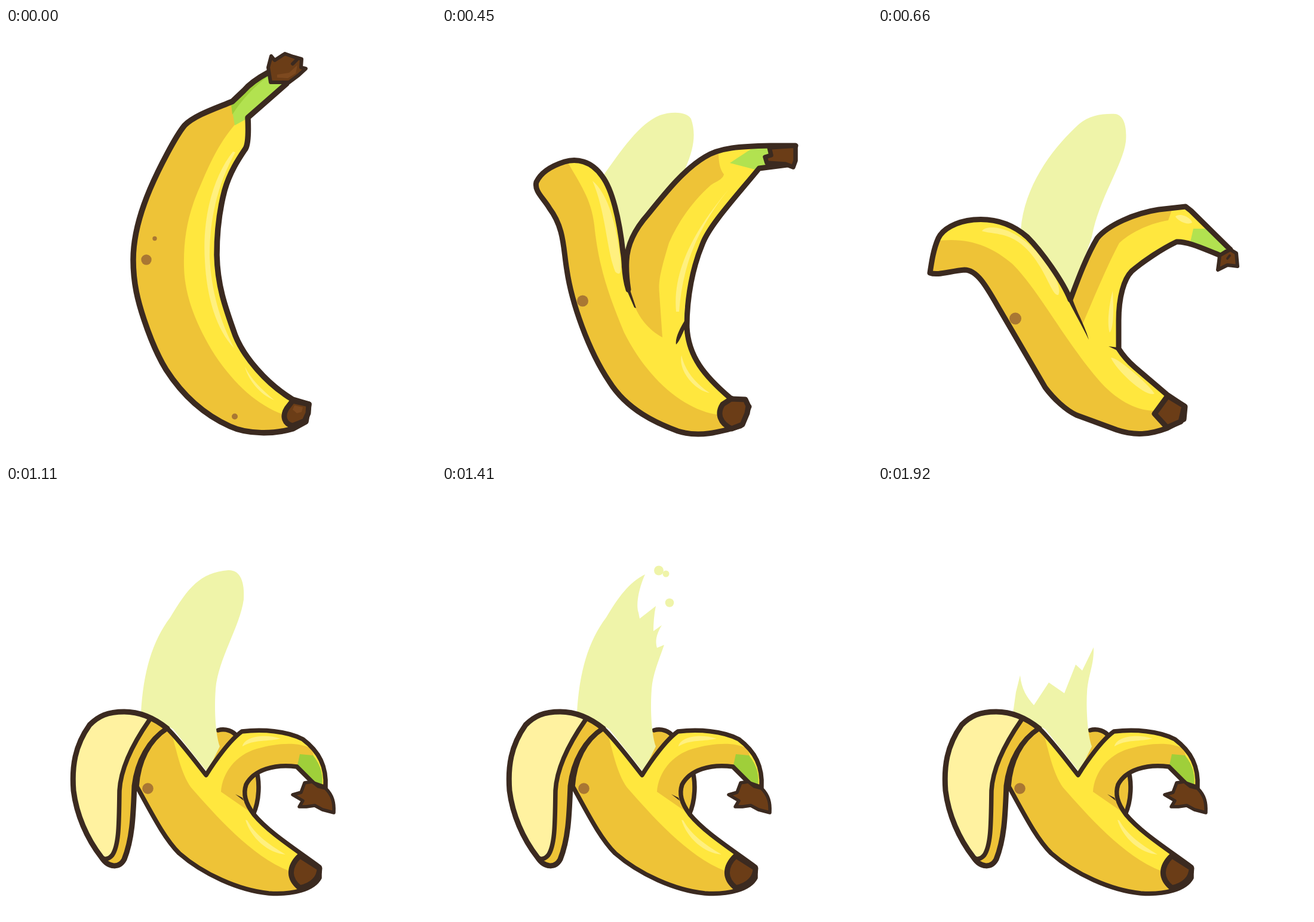
An HTML page without scripts for the animation above (2130 ms loop, 720 px wide and 720 px high).

```html
<!DOCTYPE html>
<html lang="en">
<head>
<meta charset="utf-8">
<title>Peeling banana</title>
<style>
html, body { margin: 0; width: 100%; height: 100%; overflow: hidden; background: #fff; }
svg { display: block; width: 100%; height: 100%; }
.ink { fill: none; stroke: #3b2a20; stroke-width: 9; stroke-linejoin: round; stroke-linecap: round; }
.thin { stroke-width: 7.5; }
.fine { stroke-width: 6; }
.crack { fill: #3b2a20; }
.sun { fill: #ffe73e; }
.amber { fill: #eec337; }
.lime { fill: #b2e250; }
.leaf { fill: #9fcf3a; }
.bark { fill: #6b3d17; }
.wood { fill: #7d491f; }
.spot { fill: #a97733; }
.glow { fill: #fff07f; }
.flesh { fill: #eff4a9; }
.cream { fill: #fff2a0; }

/* one loop: 240, 450, 660, 870, 1110, then bites at 1410, 1590, 1770, 1920 ms */
.on { opacity: 0; animation: 2130ms step-end infinite; }
.p0 { animation-name: p0; } .p1 { animation-name: p1; } .p2 { animation-name: p2; }
.p3 { animation-name: p3; } .p4 { animation-name: p4; } .p5 { animation-name: p5; }
.whole { animation-name: whole; } .bite1 { animation-name: bite1; }
.bite2 { animation-name: bite2; } .bite3 { animation-name: bite3; }
.crumb1 { animation-name: crumb1; } .crumb2 { animation-name: crumb2; } .crumb3 { animation-name: crumb3; }
@keyframes p0 { 0% { opacity: 1 } 11.268%, to { opacity: 0 } }
@keyframes p1 { 0% { opacity: 0 } 11.268% { opacity: 1 } 21.127%, to { opacity: 0 } }
@keyframes p2 { 0% { opacity: 0 } 21.127% { opacity: 1 } 30.986%, to { opacity: 0 } }
@keyframes p3 { 0% { opacity: 0 } 30.986% { opacity: 1 } 40.845%, to { opacity: 0 } }
@keyframes p4 { 0% { opacity: 0 } 40.845% { opacity: 1 } 52.113%, to { opacity: 0 } }
@keyframes p5 { 0% { opacity: 0 } 52.113%, to { opacity: 1 } }
@keyframes whole { 0% { opacity: 1 } 66.197%, to { opacity: 0 } }
@keyframes bite1 { 0% { opacity: 0 } 66.197% { opacity: 1 } 74.648%, to { opacity: 0 } }
@keyframes bite2 { 0% { opacity: 0 } 74.648% { opacity: 1 } 83.099%, to { opacity: 0 } }
@keyframes bite3 { 0% { opacity: 0 } 83.099%, to { opacity: 1 } }
@keyframes crumb1 {
  0% { opacity: 0 }
  66.197% { opacity: 1; transform: none }
  69.014% { opacity: 1; transform: translate(20px, 4px) }
  71.831% { opacity: 1; transform: translate(38px, 16px) }
  74.648%, to { opacity: 0 }
}
@keyframes crumb2 {
  0% { opacity: 0 }
  74.648% { opacity: 1; transform: none }
  77.465% { opacity: 1; transform: translate(-24px, 4px) }
  80.282% { opacity: 1; transform: translate(-46px, 16px) }
  83.099%, to { opacity: 0 }
}
@keyframes crumb3 {
  0% { opacity: 0 }
  83.099% { opacity: 1; transform: none }
  86.62% { opacity: 1; transform: translate(14px, 8px) }
  90.141%, to { opacity: 0 }
}
</style>
</head>
<body>
<svg viewBox="0 0 720 720">
<defs>
  <path id="b0" d="M440 74C425 82 410 91 398 105L379 123C350 135 316 146 299 163C284 181 256 235 241 270C222 315 213 355 213 388C213 428 221 458 231 488C241 518 252 546 268 572C297 617 335 649 375 667C405 681 450 680 480 671L502 659L507 630L480 622C435 595 398 550 384 515C366 465 354 430 353 380C353 345 356 310 366 272C375 240 391 217 401 202Q407 192 405 150L470 93Z"/>
  <path id="b1" d="M290 322C286 280 298 225 312 195C322 172 333 158 343 147L345 143L331 133C300 140 280 165 268 190C245 235 220 280 211 315C203 350 204 380 204 410C207 460 224 510 254 557C290 612 360 662 420 680H452C475 679 490 674 503 664L510 632L467 605C435 572 408 540 398 500C385 460 380 430 381 390C383 340 395 300 415 265C430 240 445 230 456 215V190C475 177 495 170 518 167V130C485 133 455 146 428 153L406 153C385 178 365 200 340 225C310 255 298 290 290 322Z"/>
  <path id="b2" d="M312 438C303 410 307 395 303 375C297 320 285 270 268 248C250 222 225 218 205 224C180 232 165 243 158 258C154 273 170 285 180 302C205 335 203 370 209 405C217 460 245 540 280 592C310 640 360 662 395 675C430 686 465 677 500 666L514 634L482 619C440 583 412 550 410 500C410 450 420 400 436 362C448 330 490 285 531 235L578 229L592 197H550C500 198 465 200 440 216C405 237 375 275 345 312C320 340 310 365 309 390C308 410 310 425 312 438Z"/>
  <path id="b3" d="M322 455C310 425 275 375 250 350C225 328 195 318 160 321C130 324 108 337 101 352C93 370 90 390 87 410C100 415 120 407 145 405C165 405 180 430 200 465L280 602C295 622 315 640 332 648L400 673C430 683 455 681 484 670L512 655L514 634L484 614L430 568C415 555 408 545 403 537V490C403 450 412 420 425 407C445 390 475 370 500 358C520 357 550 372 574 381L590 371L524 306L515 299L470 304C430 310 385 330 367 352C350 380 335 420 322 455Z"/>
  <path id="b4" d="M340 483C355 460 380 425 402 401C430 397 460 400 487 413C515 430 527 455 525 484L507 476C495 462 475 457 455 458C425 460 403 485 396 510C400 530 412 548 425 562C445 588 480 610 518 638L515 658C490 685 440 686 400 677C350 665 298 637 275 608C245 573 235 545 228 520C215 490 205 475 189 467C205 430 240 412 278 408C292 418 315 450 340 483Z"/>
  <path id="b5" d="M335 484C350 460 375 425 395 411C430 407 470 410 497 424C525 445 537 470 535 505L515 498L487 470C450 465 415 475 402 500C397 515 400 530 415 550C440 580 480 605 525 638V656C515 675 480 685 440 682C390 677 330 650 290 615C265 590 245 550 219 503C222 460 240 425 270 406C290 425 320 465 335 484Z"/>
  <path id="l4" d="M278 408C250 390 215 375 175 377C160 377 140 385 125 400C95 430 90 470 95 505C100 530 115 552 132 547C145 540 165 505 176 480L189 467C205 430 240 412 278 408Z"/>
  <path id="l5" d="M270 406C250 390 225 378 198 378C170 378 155 385 140 400C115 435 110 470 113 510C118 550 135 590 160 622C172 640 190 640 198 625C212 590 213 550 215 502C220 460 240 425 270 406Z"/>
  <path id="core" d="M226 380C230 310 245 260 275 220C305 170 325 145 372 141C392 140 400 160 398 190C392 235 355 290 351 340C348 380 352 420 358 436L337 479L280 407Z"/>
  <path id="rim" d="M355 409C368 405 380 411 386 418M418 472C426 495 424 528 414 550"/>
  <path id="back" d="M350 410C375 402 390 417 400 430C425 465 432 515 414 550L337 480Z"/>
  <clipPath id="k0"><use href="#b0"/></clipPath>
  <clipPath id="k1"><use href="#b1"/></clipPath>
  <clipPath id="k2"><use href="#b2"/></clipPath>
  <clipPath id="k3"><use href="#b3"/></clipPath>
  <clipPath id="k4"><use href="#b4"/></clipPath>
  <clipPath id="k5"><use href="#b5"/></clipPath>
</defs>

<g class="on p0">
  <use href="#b0" class="amber"/>
  <g clip-path="url(#k0)">
    <path class="sun" d="M383 162C355 195 340 230 325 265C305 310 297 350 298 400C299 450 320 500 350 548C385 600 425 635 470 649L530 640L420 480V140Z"/>
    <path class="lime" d="M377 128L440 66L490 85L405 151L383 163Z"/>
    <path class="leaf" d="M377 128L440 66V80C415 98 395 120 379 145Z"/>
    <path class="glow" d="M380 207C350 245 328 310 333 390C336 450 352 505 382 536C358 490 344 440 341 385C340 320 355 260 384 208ZM400 567C405 588 425 614 449 623C428 605 410 588 400 567Z"/>
  </g>
  <circle class="spot" cx="235" cy="388" r="8.7"/>
  <circle class="spot" cx="249" cy="352.500" r="3.700"/>
  <circle class="spot" cx="383" cy="650.500" r="5"/>
  <use href="#b0" class="ink" style="stroke-width:9.500"/>
  <path class="bark" d="M480 624L507 630L506 645L500 658L480 666C466 663 462 650 470 637Z"/>
  <path class="wood" d="M483 632L497 635L495 643L487 645L480 639Z"/>
  <path class="ink" d="M480 624L507 630L506 645L500 658L480 666C466 663 462 650 470 637Z"/>
  <path class="bark" d="M443 91L439 66L444 47L450 54L467 43L481 48L495 52L494 66L502 68L490 79L474 91Z"/>
  <path class="wood" d="M454 78L474 75L488 62L485 76L472 84L454 83Z"/>
  <path class="ink fine" d="M443 91L439 66L444 47L450 54L467 43L481 48L495 52L494 66L502 68L490 79L474 91ZM480 60L487 53"/>
</g>

<g class="on p1">
  <path class="flesh" d="M292 310C286 250 312 180 348 143C365 140 383 139 391 160L340 230Z"/>
  <use href="#b1" class="amber"/>
  <g clip-path="url(#k1)">
    <path class="sun" d="M325 130C329 160 300 180 285 215C275 240 273 255 274 273H272C268 360 290 430 320 495C350 560 400 625 465 643L540 620L480 100Z"/>
    <path class="amber" d="M400 145L414 153C417 175 412 185 405 190C385 203 350 240 335 270C315 315 313 380 312 435C308 443 303 420 293 330L286 320Z"/>
    <path class="lime" d="M416 176L430 150L510 125V172L455 187Z"/>
    <path class="glow" d="M434 215C395 250 358 320 358 400C357 440 358 455 367 464C367 380 367 300 434 215ZM379 505C380 555 415 598 443 602C415 580 395 550 383 507Z"/>
  </g>
  <ellipse class="spot" cx="220.500" cy="429.500" rx="9.700" ry="8.700"/>
  <use href="#b1" class="ink thin"/>
  <path class="crack" d="M288 322C288 350 290 375 298 403C298 380 294 355 293 322Z"/>
  <path class="ink" style="fill:#6b3d17" d="M488 621L508 632L501 662L488 671C472 671 462 658 463 641Z"/>
  <path class="ink thin" style="fill:#6b3d17" d="M510 131L533 131L542 122L545 135L554 148L544 157L546 174L528 163L506 165L511 155L503 149L504 140L512 140Z"/>
</g>

<g class="on p2">
  <path class="flesh" d="M268 250C300 205 330 160 365 146C385 139 410 140 417 152C425 175 423 200 407 236L345 320L309 385Z"/>
  <use href="#b2" class="amber"/>
  <g clip-path="url(#k2)">
    <path class="sun" d="M209 222C230 260 250 285 255 330C262 400 280 450 305 510C340 580 400 640 465 648L540 630L600 190H330Z"/>
    <path class="amber" d="M463 195C462 230 467 238 472 245C470 255 455 258 448 265C420 290 395 325 380 360C365 410 362 425 364 445L369 518C345 505 330 485 320 460L300 400L360 240Z"/>
    <path class="lime" d="M482 226L517 203L552 195V232L528 238Z"/>
    <path class="glow" d="M252 256C275 310 275 370 290 408C300 418 302 405 297 375C290 320 275 275 252 256ZM480 270C430 330 385 400 392 475H397C402 410 420 345 480 270ZM401 548C395 575 425 608 448 611C425 595 407 575 401 548Z"/>
  </g>
  <circle class="spot" cx="235.500" cy="457" r="9.500"/>
  <use href="#b2" class="ink"/>
  <path class="crack" d="M309 438L314 436L325 469L322 468ZM407 489C398 503 390 520 392 530C400 522 404 505 411 497Z"/>
  <path class="ink" style="fill:#6b3d17" d="M484 621L508 622L513 633L511 645L503 664L485 671C465 662 460 645 470 630Z"/>
  <path class="ink thin" style="fill:#6b3d17" d="M548 200L592 197V222L588 233L575 228L544 226L541 216L551 213Z"/>
</g>

<g class="on p3">
  <path class="flesh" d="M239 338C245 265 290 205 330 167C350 146 375 143 398 144C412 147 417 165 415 190C410 230 370 285 358 350L322 455Z"/>
  <use href="#b3" class="amber"/>
  <g clip-path="url(#k3)">
    <path class="sun" d="M95 357C150 349 190 365 225 395C270 440 310 520 370 590C400 625 440 645 470 640L540 630L610 380L520 280H80Z"/>
    <path class="amber" d="M318 455L365 345L440 295L494 299L486 322C450 328 420 345 404 360C385 395 360 455 343 495Z"/>
    <path class="lime" d="M528 336H550L595 374L574 386L523 358Z"/>
    <path class="glow" d="M174 340C180 330 215 330 250 360C280 385 310 430 302 447C290 450 280 395 240 362C215 342 190 345 174 340ZM393 440C385 470 384 500 388 510C396 500 394 460 393 440ZM498 316C505 308 525 318 526 326C518 330 505 325 498 316ZM390 552C400 550 455 598 463 612C450 620 400 575 390 552Z"/>
  </g>
  <circle class="spot" cx="230" cy="486.500" r="10"/>
  <use href="#b3" class="ink"/>
  <path class="crack" d="M319 457C328 475 345 505 353 522C347 500 335 480 326 455ZM386 533L405 542L402 535Z"/>
  <path class="ink" style="fill:#6b3d17" d="M485 616L513 633L507 659L484 669L463 646Z"/>
  <path class="ink fine" style="fill:#6b3d17" d="M572 381L590 371L600 377L602 399L585 397L569 405L571 390Z"/>
  <path class="ink" style="stroke-width:4" d="M585 386L589 381"/>
</g>

<g class="on p4">
  <use href="#back" class="amber"/>
  <use href="#rim" class="ink thin"/>
  <use href="#core" class="flesh"/>
  <use href="#l4" class="amber"/>
  <path class="cream" d="M248 392C215 379 195 376 170 377C140 380 125 400 115 412C90 440 88 490 104 526C115 532 126 528 132 517C147 500 152 485 160 470C170 448 190 428 210 416Z"/>
  <path class="ink fine" d="M104 526C115 532 126 528 132 517C147 500 152 485 160 470C170 448 190 428 210 416C225 406 238 400 250 393"/>
  <use href="#l4" class="ink fine"/>
  <use href="#b4" class="amber"/>
  <g clip-path="url(#k4)">
    <path class="sun" d="M285 405C292 450 300 490 325 520C370 565 410 630 465 650L540 640L420 550L540 490V390H330Z"/>
    <path class="amber" d="M362 510C370 470 390 435 430 425C460 418 490 418 507 435L535 484L440 480L400 510L411 549Z"/>
    <path class="leaf" d="M488 436L506 439L535 484L512 482L480 460Z"/>
    <path class="glow" d="M390 433C398 410 425 402 449 410C440 418 415 407 405 430C399 434 393 434 390 433ZM399 559C405 590 435 615 463 617C435 605 415 585 403 560Z"/>
  </g>
  <ellipse class="spot" cx="240" cy="507" rx="9.300" ry="8"/>
  <use href="#b4" class="ink thin"/>
  <path class="ink" style="stroke-width:3" d="M385 508L398 523"/>
  <path class="ink" style="fill:#6b3d17" d="M484 621L516 639C517 655 506 667 482 672C463 655 463 638 484 621Z"/>
  <path class="ink" style="fill:#6b3d17;stroke-width:5" d="M510 480L516 484L523 480L528 488C537 493 541 502 540 513L526 512L514 509L499 515L501 505L486 501L496 489Z"/>
</g>

<g class="on p5">
  <use href="#back" class="amber"/>
  <use href="#rim" class="ink thin"/>
  <use href="#core" class="flesh on whole"/>
  <path class="flesh on bite1" d="M226 380C230 310 245 260 275 220C295 187 312 162 340 148C328 175 325 200 329 212L331 222L358 201C355 215 354 230 354 243L368 233C358 250 357 260 360 271L372 266C362 295 353 315 351 340C348 380 352 420 358 436L337 479L280 407Z"/>
  <path class="flesh on bite2" d="M226 380C229 325 238 282 256 248C258 266 266 278 276 285L296 252L316 270L334 238L345 254L354 243L368 233C358 250 357 260 360 271L372 266C362 295 353 315 351 340C348 380 352 420 358 436L337 479L280 407Z"/>
  <path class="flesh on bite3" d="M226 380L231 345L238 317C240 340 250 355 261 367L286 329L312 347L331 299L342 309L361 270C362 300 352 315 350 345C348 380 352 420 358 436L337 479L280 407Z"/>
  <g class="flesh">
    <g class="on crumb1"><circle cx="363" cy="141.500" r="8"/><circle cx="375" cy="147" r="5.500"/><circle cx="381" cy="195.500" r="7.300"/></g>
    <g class="on crumb2"><circle cx="247" cy="212" r="8"/><circle cx="236" cy="219" r="5.500"/><circle cx="209" cy="250" r="7"/></g>
    <g class="on crumb3"><circle cx="288" cy="282" r="7"/><circle cx="300" cy="289" r="5"/><circle cx="330" cy="258" r="6"/></g>
  </g>
  <use href="#l5" class="amber"/>
  <path class="cream" d="M240 392C215 377 195 377 180 379C155 384 145 395 137 405C110 440 109 490 116 530C123 565 140 597 160 622C165 626 172 625 178 618C190 600 189 560 190 510C192 475 210 435 240 392Z"/>
  <path class="ink thin" d="M160 622C165 626 172 625 178 618C190 600 189 560 190 510C192 475 210 435 240 392"/>
  <use href="#l5" class="ink"/>
  <use href="#b5" class="amber"/>
  <g clip-path="url(#k5)">
    <path class="sun" d="M275 405C285 440 292 480 310 505C350 550 410 620 475 645L540 640L420 550L550 500V395H330Z"/>
    <path class="amber" d="M360 512C362 480 385 450 420 440C455 430 490 428 512 440L525 490L440 485L400 515L412 548Z"/>
    <path class="leaf" d="M492 449L514 451C525 465 532 480 529 502L510 500L487 472Z"/>
    <path class="glow" d="M396 435C402 418 435 415 460 423C440 428 415 424 396 436ZM401 559C410 590 440 615 468 617C440 600 418 585 404 560Z"/>
  </g>
  <circle class="spot" cx="237.500" cy="506.500" r="9.300"/>
  <use href="#b5" class="ink thin"/>
  <path class="crack" d="M384 516L398 527L396 522Z"/>
  <path class="ink" style="fill:#6b3d17" d="M492 619L525 640C525 656 513 669 492 673C473 658 472 638 492 619Z"/>
  <path class="ink" style="fill:#6b3d17;stroke-width:5.500" d="M500 497L513 495L523 503L535 506C547 518 550 530 549 547L530 542L517 535L503 537L491 537L497 527L480 517L494 513Z"/>
</g>
</svg>
</body>
</html>
```
